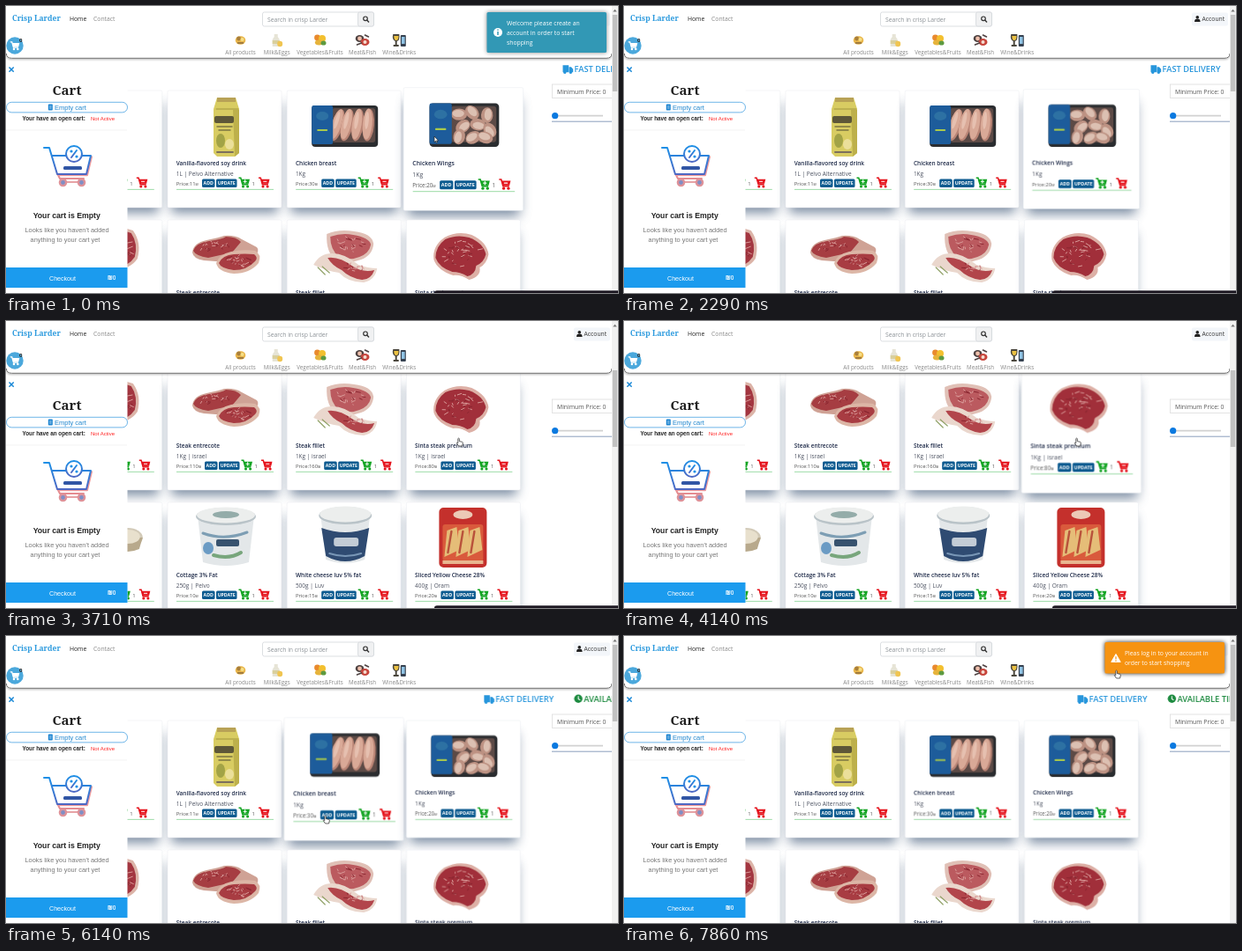
An HTML page that plays this animation: 693 by 326 pixels, repeating every 8 s.

```html
<!DOCTYPE html>
<html lang="en">
<head>
<meta charset="utf-8">
<title>Grocery shop</title>
<style>
html, body { margin: 0; width: 100%; height: 100%; overflow: hidden; background: #fff; }
svg.stage { display: block; width: 100%; height: 100%; }
text { font-family: "Open Sans", "Noto Sans", sans-serif; font-size: 6.8px; fill: #555; }
.arial { font-family: "Liberation Sans", sans-serif; }
.brand { font: 600 8.5px "Noto Serif", serif; fill: #2b9ade; }
.name { font-size: 6.5px; font-weight: 600; fill: #1f2b49; }
.sub { font-size: 6.5px; fill: #4b5160; }
.price { font-size: 5.9px; }
.btn { font-size: 5.2px; font-weight: 700; fill: #fff; text-anchor: middle; }
.cat { font-size: 6.25px; fill: #8a8a8a; text-anchor: middle; }
.banner { font-size: 9.3px; font-weight: 600; }
.white { fill: #fff; }
.mid { text-anchor: middle; }

.scroll, .thumb, .marquee, .cursor, .toast, .strip, .arrow, .hand, .card { animation: 8s linear infinite; }
.marquee { animation-name: marquee; animation-timing-function: steps(56); }
.scroll { animation-name: scroll; animation-timing-function: ease-in-out; }
.thumb { animation-name: thumb; animation-timing-function: ease-in-out; }
.cursor { animation-name: cursor; animation-timing-function: ease-in-out; }
.arrow { animation-name: arrow; animation-timing-function: step-end; }
.hand { animation-name: hand; animation-timing-function: step-end; }
.strip { animation-name: strip; animation-timing-function: step-end; }
.info { animation-name: info; filter: drop-shadow(0 0 2.5px #888); }
.warn { animation-name: warn; filter: drop-shadow(0 0 2.5px #222); }
.card { transform-origin: 64.5px 66.5px; }
.shadow { fill: #3d5676; filter: blur(6.5px); opacity: .68; }
.wings { animation-name: wings; }
.sinta { animation-name: sinta; }
.breast { animation-name: breast; }

@keyframes marquee { to { transform: translateX(-119px); } }
@keyframes scroll { 0%, 41%, 56%, 100% { transform: none; } 45%, 52% { transform: translateY(-184px); } }
@keyframes thumb { 0%, 41%, 56%, 100% { transform: none; } 45%, 52% { transform: translateY(46px); } }
@keyframes cursor {
  0%, 24% { transform: translate(485px, 148px); }
  28%, 40% { transform: translate(513px, 332px); }
  44%, 55% { transform: translate(512px, 133px); }
  60%, 66% { transform: translate(654px, 10px); }
  74%, 80% { transform: translate(361px, 204px); }
  92%, 100% { transform: translate(557px, 39px); }
}
@keyframes arrow { 0% { opacity: 1; } 42%, 100% { opacity: 0; } }
@keyframes hand { 0% { opacity: 0; } 42%, 100% { opacity: 1; } }
@keyframes strip { 0% { opacity: 1; } 66%, 100% { opacity: 0; } }
@keyframes info { 0%, 20% { opacity: 1; } 25%, 100% { opacity: 0; } }
@keyframes warn { 0%, 80% { opacity: 0; } 84%, 100% { opacity: 1; } }
@keyframes wings { 0%, 25%, 57%, 59% { transform: scale(1.05); } 31%, 54%, 63%, 100% { transform: none; } }
@keyframes sinta { 0%, 46.5%, 56%, 100% { transform: none; } 49%, 53% { transform: scale(1.05); } }
@keyframes breast { 0%, 71%, 89%, 100% { transform: none; } 74%, 84% { transform: scale(1.05); } }
</style>
</head>
<body>
<svg class="stage" viewBox="0 0 693 326" preserveAspectRatio="none">
  <defs>
    <symbol id="cart" viewBox="0 0 12 12" overflow="visible">
      <path d="M0 1h2.2l2 7H10.5" fill="none" stroke="currentColor" stroke-width="1.5"/>
      <path d="M2.4 2.4H12L10.8 7.2H3.8z" fill="currentColor"/>
      <circle cx="4.8" cy="10.3" r="1.5" fill="currentColor"/><circle cx="9.7" cy="10.3" r="1.5" fill="currentColor"/>
    </symbol>
    <linearGradient id="cool" x2="0" y2="1"><stop stop-color="#1d8fe6"/><stop offset="1" stop-color="#4d68c4"/></linearGradient>
  </defs>
  <rect width="693" height="326" fill="#fff"/>

  <g class="scroll">
    <g class="marquee">
      <g fill="#2796dc">
        <path d="M630.5 67.2h6.7v8h-6.7zM637.6 69.2h2.4l2.2 2.6v3.4h-4.6z"/>
        <circle cx="632.8" cy="75.4" r="1.6"/><circle cx="639.4" cy="75.4" r="1.6"/>
        <text class="banner" x="643.5" y="74.8" style="fill:#2796dc">FAST DELIVERY</text>
      </g>
      <circle cx="737.3" cy="71.3" r="4.7" fill="#1c8a3f"/>
      <path d="M737.3 68.3v3.2l2 1.2" fill="none" stroke="#fff" stroke-width="1.1"/>
      <text class="banner" x="743.5" y="74.8" style="fill:#1c8a3f">AVAILABLE TIMES</text>
    </g>
    <g id="cards"></g>
  </g>

  <!-- price filter -->
  <rect x="618.5" y="89" width="75" height="15.5" fill="#fff" stroke="#ddd" stroke-width=".8"/>
  <text x="624" y="99.5">Minimum Price: 0</text>
  <path d="M618 124.7h58" stroke="#d2d2d2" stroke-width="1.8"/>
  <circle cx="621.7" cy="124.7" r="3.6" fill="#0b79e0"/>
  <path d="M618 131.2h68" stroke="#7d93b5" stroke-width=".9"/>

  <!-- cart panel -->
  <g>
    <rect y="60" width="137.5" height="266" fill="#fff"/>
    <path d="M3.5 69.5l5.2 5.2m0-5.2l-5.2 5.2" stroke="#1787d6" stroke-width="1.5"/>
    <text x="69" y="100.5" class="mid" style="font:600 15px 'Noto Serif',serif;fill:#222">Cart</text>
    <rect x=".5" y="109.3" width="137" height="11.6" rx="5.8" fill="#fff" stroke="#4aa3e3" stroke-width=".8"/>
    <rect x="47.8" y="111.6" width="5" height="7" rx=".8" fill="#1f86d1"/>
    <path d="M49 114h2.6m-2.6 2h2.6" stroke="#fff" stroke-width=".6"/>
    <text class="arial" x="55" y="117.8" style="font-size:7.5px;fill:#2187cf">Empty cart</text>
    <text class="arial" x="18.5" y="130.3" style="font-size:6.3px;font-weight:700;fill:#222">Your have an open cart:</text>
    <text class="arial" x="96" y="130.3" style="font-size:6px;fill:#f22">Not Active</text>
    <path d="M0 141h137" stroke="#ececec" stroke-width=".7"/>
    <g fill="none" stroke="url(#cool)" stroke-width="2" stroke-linejoin="round" stroke-linecap="round">
      <path d="M58 190l3 6h27" stroke="#e58b90"/>
      <path d="M53 170h43l-5 21H59z" stroke="#ee9a9c" transform="translate(1 1.2)"/>
      <path d="M43 161h6l9 30h33l5-21H52" fill="#fff"/>
      <circle cx="77" cy="168" r="9" fill="#fff"/>
      <path d="M74 172l6-8"/>
    </g>
    <circle cx="74" cy="165" r="1.6" fill="#1d8fe6"/><circle cx="80" cy="171" r="1.6" fill="#1d8fe6"/>
    <rect x="65" y="182" width="21" height="4" rx="1.5" fill="#3156a5"/>
    <path d="M64 200h22" stroke="#e7a3a6" stroke-width="2"/>
    <g fill="#7f8fc6" stroke="#de9299" stroke-width="2.4"><circle cx="64.5" cy="200.5" r="3.6"/><circle cx="85.5" cy="200.5" r="3.6"/></g>
    <text class="arial mid" x="68.7" y="241.3" style="font-size:8.7px;font-weight:700;fill:#222">Your cart is Empty</text>
    <text class="arial mid" x="69" y="256.7" style="font-size:7.4px;fill:#777">Looks like you haven't added</text>
    <text class="arial mid" x="67" y="267.5" style="font-size:7.4px;fill:#777">anything to your cart yet</text>
    <rect y="297" width="137.5" height="23" fill="#1b9bee"/>
    <text class="arial white mid" x="64" y="311.5" style="font-size:7.1px">Checkout</text>
    <text class="white" x="115" y="311" style="font-size:6.3px;font-weight:600">₪0</text>
  </g>

  <!-- header -->
  <g>
    <path d="M0 0H686V54q0 6-6 6H6q-6 0-6-6z" fill="#fff" style="filter:drop-shadow(0 1px 1px #0004)"/>
    <path d="M.4 54q0 5.3 6 5.3H680q6 0 6-5.3" fill="none" stroke="#6a6a6a" stroke-width="1"/>
    <text class="brand" x="7" y="17.3">Crisp Larder</text>
    <text x="72" y="17" style="fill:#222">Home</text>
    <text x="99" y="17" style="fill:#888">Contact</text>
    <rect x="290.5" y="7" width="126" height="16" rx="2" fill="#fff" stroke="#d3d7db" stroke-width=".8"/>
    <rect x="398.5" y="7" width="18" height="16" rx="2" fill="#f0f1f2" stroke="#d3d7db" stroke-width=".8"/>
    <text x="296" y="17.5" style="fill:#8b9196">Search in crisp Larder</text>
    <circle cx="407" cy="14.3" r="2.3" fill="none" stroke="#333" stroke-width="1.2"/>
    <path d="M408.7 16l2.3 2.4" stroke="#333" stroke-width="1.4"/>
    <g id="categories"></g>
    <circle cx="10" cy="45" r="9.7" fill="#4ba8dc"/>
    <use href="#cart" x="4.8" y="40" width="10.5" height="10.5" color="#fff"/>
    <text x="15" y="40.5" style="font-size:6px;font-weight:700;fill:#222">0</text>
    <rect x="643" y="7.5" width="41" height="15" rx="2" fill="#f3f6fa"/>
    <circle cx="649.3" cy="12.8" r="1.8" fill="#222"/><path d="M646 18q0-3.4 3.3-3.4t3.3 3.4z" fill="#222"/>
    <text x="654.5" y="17" style="fill:#333">Account</text>
  </g>

  <rect x="686" width="7" height="326" fill="#f1f1f1"/>
  <path d="M687.3 6.5h4.4l-2.2-2.7z" fill="#777"/>
  <rect class="thumb" x="686.8" y="10" width="5.4" height="87" fill="#c1c1c1"/>
  <path class="strip" d="M485 326q0-2.8 3-2.8H693v3z" fill="#1d1822"/>

  <g class="toast info">
    <rect x="544.5" y="7" width="135.5" height="46" rx="1.6" fill="#3298b5"/>
    <circle cx="557" cy="30" r="5" fill="#fff"/>
    <path d="M557 29v4m0-6.5v1.3" stroke="#3298b5" stroke-width="1.5"/>
    <text class="white" x="567" y="22.4">Welcome please create an</text>
    <text class="white" x="567" y="33.4">account in order to start</text>
    <text class="white" x="567" y="44">shopping</text>
  </g>
  <g class="toast warn">
    <rect x="544.5" y="7" width="135.5" height="35.5" rx="1.6" fill="#f69311"/>
    <path d="M557 20.5l5.2 9h-10.4z" fill="#fff" stroke="#fff" stroke-linejoin="round"/>
    <path d="M557 23.3v3.2m0 1v1.4" stroke="#f69311" stroke-width="1.2"/>
    <text class="white" x="567" y="22.4">Pleas log in to your account in</text>
    <text class="white" x="567" y="33.2">order to start shopping</text>
  </g>

  <g class="cursor" stroke="#222" stroke-width=".7" fill="#fff" stroke-linejoin="round">
    <path class="arrow" d="M0 0v6.6l1.5-1.3 1 2.2 1-.5-1-2.1h2z"/>
    <path class="hand" d="M-.2 .6q.8-1 1.5 0V3.6l3.4 .8q.8 .3 .6 1.2L4.6 9H.6L-1.8 5.6q.4-1 1.6 0z"/>
  </g>
</svg>
<script>
const shape = (d, fill) => `<path d="${d}" fill="${fill}"/>`;
const line = (d, stroke, width = 1) => `<path d="${d}" fill="none" stroke="${stroke}" stroke-width="${width}" stroke-linecap="round"/>`;
const dot = (x, y, rx, fill, ry = rx) => `<ellipse cx="${x}" cy="${y}" rx="${rx}" ry="${ry}" fill="${fill}"/>`;
const box = (x, y, w, h, fill, r = 0) => `<rect x="${x}" y="${y}" width="${w}" height="${h}" rx="${r}" fill="${fill}"/>`;
const label = (cls, x, y, s) => `<text class="${cls}" x="${x}" y="${y}">${s}</text>`;

let seed = 7;
const random = () => (seed = seed * 16807 % 2147483647) / 2147483647;

// Short fat and shade flecks scattered over an oval of meat.
function marble(x, y, rx, ry, count) {
  let flecks = '';
  for (let i = 0; i < count; i++) {
    const angle = random() * 6.28, r = Math.sqrt(random());
    const dx = (random() - .3) * 8, dy = (random() - .5) * 5;
    flecks += line(`M${(x + rx * r * Math.cos(angle)).toFixed(1)} ${(y + ry * r * Math.sin(angle)).toFixed(1)}l${dx.toFixed(1)} ${dy.toFixed(1)}`,
      i % 3 ? '#d99a98' : '#8a2630', 1);
  }
  return flecks;
}

const tray = meat => box(28, 17, 75, 47, '#2b2d30', 4) + box(51, 20, 49, 39, '#5c4a46', 3) + meat
  + box(28, 17, 24, 44, '#1d5c9b', 2) + dot(40, 29, 7, '#2d71a3', 5) + line('M35 45h10', '#a9c94c', 2);

const tub = (x, y, w, h, band) => shape(`M${x + 2} ${y + 10}h${w - 4}l-6 ${h - 14}q-${w / 2 - 8} 8-${w - 16} 0z`, '#e3e7e9')
  + band + dot(x + w / 2, y + 11, w / 2, '#b9c3c8', 10) + dot(x + w / 2, y + 9.5, w / 2 - 1, '#eceeed', 9);

const art = {
  carton: shape('M56 8h21l4 13v50l-5 4H56l-4-4V21z', '#d8cc62') + shape('M56 8h21v5H56z', '#b8a256')
    + shape('M74 22h7v49l-5 4z', '#bdb04b') + line('M55 21h25', '#a1963f') + box(53, 29, 22, 8, '#5d5738', 2)
    + line('M56 41h17m-15 4h13', '#7b7443', 1.4) + dot(60, 57, 5, '#a2a346', 8) + dot(70, 61, 5, '#ebdf9a', 6)
    + line('M56 70h18', '#7b6f5b', 1.8),
  breast: tray([56, 67, 79, 91].map((x, i) => `<g transform="rotate(${17 - i * 4} ${x} 39)">`
    + dot(x + 1, 39, 6.6, '#b98475', 18.5) + dot(x, 38, 5.4, '#d9a997', 17.5) + dot(x - 1, 34, 2.2, '#e6c0b0', 10) + '</g>').join('')),
  wings: tray([[60, 29], [74, 27], [90, 30], [64, 42], [80, 40], [93, 46], [60, 53], [75, 54], [88, 54]].map(([x, y], i) =>
    `<g transform="rotate(${i * 47} ${x} ${y})">` + dot(x, y, 8.5, '#bd9283', 6.4) + dot(x - 1, y - 1, 6.4, '#dcc0b2', 3.8) + '</g>').join('')),
  entrecote: shape('M28 37q1-11 16-14t20-5q12-1 20 4l17 9q4 4-3 10l-17 8-40-3q-12-2-13-9z', '#cfa295')
    + shape('M29 35q3-9 18-11t19-5q12 0 17 6l-10 12-27 6q-14-2-17-8z', '#a63d42') + marble(52, 31, 18, 7, 24)
    + shape('M55 49q3-10 17-13t27-1q8 4 4 14-10 12-28 12-18-2-20-12z', '#dcb6a6')
    + shape('M58 49q4-9 17-10t23 0q5 4 1 8-9 10-24 10-15-2-17-8z', '#a83c42') + marble(78, 47, 16, 6, 26),
  fillet: shape('M45 16q14-6 31-3 20 2 22 14-1 13-14 18-16 6-29 0-11-8-10-29z', '#e0c0b6')
    + shape('M49 19q14-5 26-2 18 3 20 11-2 10-13 14-14 5-23 0-10-8-10-23z', '#bb5a5f') + marble(71, 29, 17, 9, 24)
    + shape('M30 51q7-13 21-13 15 0 30 13 11 4 21 4-2 13-15 16-18 0-28-11-14-2-29-9z', '#ead7cd')
    + shape('M46 43q13-2 29 10 11 7 24 4-4 11-14 11-14-2-23-11-11-5-16-14z', '#b2454b') + marble(74, 55, 15, 5, 14)
    + line('M35 54l8 8m-3-9l8 7', '#91a268', 1.2),
  sinta: shape('M31 45q-2-15 12-25 15-8 31-3 17 8 19 22-2 11-10 15 2 10-12 14-9-6-18-5-18-6-22-18z', '#ddb0a6')
    + shape('M33 43q0-13 11-21 13-6 27-2 16 6 19 19-2 9-11 13-1 10-10 12-8-5-17-5-15-5-19-16z', '#a12f3a') + marble(61, 39, 23, 15, 40),
  cottage: tub(32, 5, 68, 67, line('M40 35q24 9 50-1', '#7d9eb4', 3) + box(55, 42, 26, 8, '#37526e', 2)
    + dot(46, 52, 6, '#6b9bc4', 7) + line('M52 60q18 5 31-3', '#78a67c', 4)) + dot(66, 14, 15, '#94aca9', 4),
  white: tub(36, 4, 60, 65, shape('M39 29q27 10 54 0l-5 32q-22 12-44 0z', '#2f4b72') + box(53, 40, 28, 10, '#c3ccd6', 3)
    + line('M48 58q18 6 36 0', '#7896b6', 2)),
  yellow: box(37, 6, 54, 68, '#c4302c', 5) + box(41, 25, 46, 42, '#d95a3c', 3) + dot(64, 14, 11, '#ecc9b6', 5)
    + [0, 1, 2].map(i => shape(`M${43 + i * 13} 62l3-30 11-4 3 26z`, '#e5bd78') + line(`M${47 + i * 13} 57l4-24`, '#b9523b', 2.4)).join('')
    + box(41, 66, 46, 4, '#e9b58f'),
  rib: shape('M50 30q20-28 46-18 10 14 5 32-8 12-26 13-24-6-25-27z', '#dcb4a8')
    + shape('M53 31q18-25 41-16 8 12 4 27-7 11-22 12-21-5-23-23z', '#a33640') + marble(82, 34, 15, 13, 30),
  dip: dot(90, 40, 17, '#d2cab8', 11) + shape('M73 40h34l-4 13q-13 6-26 0z', '#b8a98c') + dot(90, 39, 14, '#e8e0cd', 8),
  none: ''
};

const products = [
  [['Milk', '1L', 9, 'none'], ['Vanilla-flavored soy drink', '1L | Pelvo Alternative', 11, 'carton'],
   ['Chicken breast', '1Kg', 30, 'breast'], ['Chicken Wings', '1Kg', 20, 'wings']],
  [['Steak', '1Kg', 90, 'rib'], ['Steak entrecote', '1Kg | israel', 110, 'entrecote'],
   ['Steak fillet', '1Kg | israel', 160, 'fillet'], ['Sinta steak premium', '1Kg | israel', 80, 'sinta']],
  [['Hummus', '400g', 12, 'dip'], ['Cottage 3% Fat', '250g | Pelvo', 10, 'cottage'],
   ['White cheese luv 5% fat', '500g | Luv', 15, 'white'], ['Sliced Yellow Cheese 28%', '400g | Oram', 20, 'yellow']]
];

const cartButton = (x, color, mark) =>
  `<use href="#cart" x="${x}" y="98.3" width="12.5" height="12.5" color="${color}"/>` + line(mark, '#fff', 1);

function card([name, sub, price, picture], col, row) {
  const shift = (String(price).length - 2) * 3;
  return `<g transform="translate(${47.8 + 135.2 * col} ${96 + 147 * row})"><g class="card ${picture}">
    <rect class="shadow" x="4" y="14" width="121" height="125"/>
    <rect width="129" height="133" rx="1.5" fill="#fff" stroke="#e8ebef" stroke-width=".5"/>
    ${art[picture]}
    ${label('name', 9.7, 84.5, name)}${label('sub', 9.7, 96.6, sub)}
    ${label('price', 9.7, 108, `Price:${price}<tspan font-size="4">₪</tspan>`)}
    <g transform="translate(${shift})">
      ${box(39, 100.5, 14.5, 9.6, '#0d5b90', 1.5)}${box(55, 100.5, 23.5, 9.6, '#0d5b90', 1.5)}
      ${label('btn', 46.2, 107.2, 'ADD')}${label('btn', 66.7, 107.2, 'UPDATE')}
      ${cartButton(80.5, '#12a422', 'M87.7 101.6v3.4m-1.6-1.7h3.2')}
      ${label('price', 95.5, 107.7, '1')}
      ${cartButton(103, '#e5141d', 'M108.7 103.3h3.2')}
    </g>
    <path d="M10 112.4h110" stroke="#86d393" stroke-width=".8"/>
  </g></g>`;
}
document.getElementById('cards').innerHTML =
  products.map((list, row) => list.map((item, col) => card(item, col, row)).join('')).join('');

const categories = [
  [265.5, 'All products', dot(0, 0, 5.8, '#e9b64b', 4.8) + dot(-2, -2, 2.4, '#a97f3b') + dot(2, -1, 2, '#f6df86') + line('M-3 3h6', '#8a6a3b', 1.4)],
  [306.7, 'Milk&amp;Eggs', shape('M-3-7h4v3l2 3v8h-8v-8l2-3z', '#e6e4d6') + box(-5, 0, 8, 4, '#d9cf9d') + dot(3.5, 4, 3, '#f0c552', 3.2)],
  [355.5, 'Vegetables&amp;Fruits', dot(-3, -3, 3.4, '#e98a2e') + dot(2.5, -2, 4, '#f3c02f') + dot(-1, 2.5, 4.6, '#e6b33b', 3) + dot(4, 3, 3, '#5d9a40', 2.6)],
  [403.5, 'Meat&amp;Fish', dot(-3, -2, 4.8, '#4d4140', 4) + dot(3, 2, 5, '#c7453c', 4) + dot(-3, -2, 2.4, '#efc0ac') + dot(3, 2, 2, '#f3dcd0') + line('M-6 5l5-2m4-9l4 2', '#4d4140', 1.6)],
  [445.3, 'Wine&amp;Drinks', shape('M-7-7h7q1 7-2.6 8v4h2v2h-6v-2h2v-4q-4-2-2.4-8z', '#4a463c') + shape('M-6-5h5.2q0 5-2.6 5t-2.6-5z', '#ecc243')
    + box(1.5, -6, 6, 13, '#35404f', 1) + box(2.7, -4, 3.6, 8, '#8fc2e3')]
];
document.getElementById('categories').innerHTML = categories.map(([x, name, icon]) =>
  `<g transform="translate(${x} 39)">${icon}</g>` + label('cat', x, 55.3, name)).join('');
</script>
</body>
</html>
```
